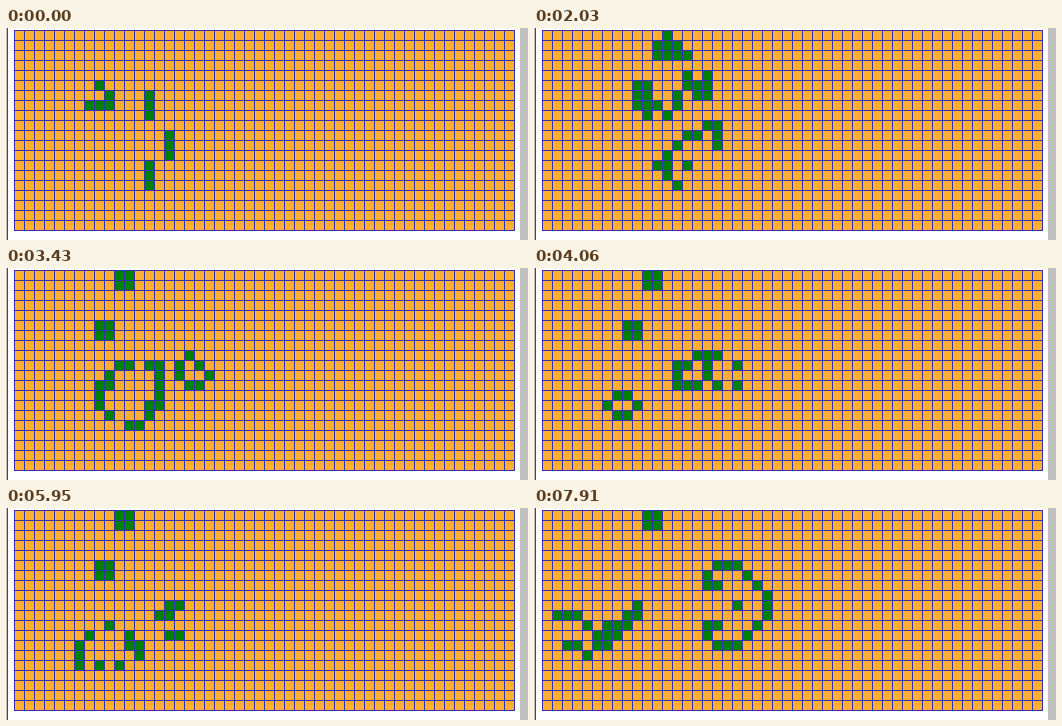
Recreate the animation shown at these times as a matplotlib script. Size 522 by 212 pixels, loop 8000 ms.

```python
import numpy as np
import matplotlib.pyplot as plt
from matplotlib.animation import FuncAnimation

W, H, DPI = 522, 212, 100
COLS, ROWS, PITCH = 50, 20, 10
LEFT, TOP = 9, 3
TICK, LOOP = 10, 8000

WHITE = (255, 255, 255)
ORANGE = (255, 175, 48)
GREEN = (0, 128, 0)
LINE = (48, 48, 176)
GREY = (192, 192, 192)
DARK = (72, 72, 72)


def first_generation():
    grid = np.zeros((ROWS, COLS), int)
    # glider
    grid[5, 8] = grid[6, 9] = 1
    grid[7, 7:10] = 1
    # three upright bars
    for row, col in ((6, 13), (10, 15), (13, 13)):
        grid[row:row + 3, col] = 1
    return grid


def step(grid):
    """Game of Life on a board whose surroundings are dead."""
    pad = np.pad(grid, 1)
    near = sum(pad[r:r + ROWS, c:c + COLS]
               for r in range(3) for c in range(3)) - grid
    return ((near == 3) | ((grid == 1) & (near == 2))).astype(int)


def generation_at(ms):
    # two generations every 210 ms, held 70 and 140 ms in turn
    pairs, rest = divmod(ms, 210)
    return 2 * pairs + (rest >= 70) + (rest >= 140)


def make_stage():
    img = np.full((H, W, 3), WHITE, np.uint8)
    img[:, 0] = GREY
    img[:, 1] = DARK
    img[:, 514:] = GREY
    right, bottom = LEFT + COLS * PITCH, TOP + ROWS * PITCH
    img[TOP - 1:bottom, LEFT - 1:right] = LINE
    return img


def paint(grid):
    img = stage.copy()
    for row in range(ROWS):
        for col in range(COLS):
            x, y = LEFT + col * PITCH, TOP + row * PITCH
            color = GREEN if grid[row, col] else ORANGE
            img[y:y + PITCH - 1, x:x + PITCH - 1] = color
    return img


stage = make_stage()
pictures = []
grid = first_generation()
for _ in range(generation_at(LOOP - TICK) + 1):
    pictures.append(paint(grid))
    grid = step(grid)

fig = plt.figure(figsize=(W / DPI, H / DPI), dpi=DPI)
board = fig.figimage(pictures[0], origin="upper")


def draw(frame):
    board.set_data(pictures[generation_at(frame * TICK)])
    return [board]


anim = FuncAnimation(fig, draw, frames=LOOP // TICK, interval=TICK,
                     repeat=True, repeat_delay=0, blit=False)
plt.show()
```
